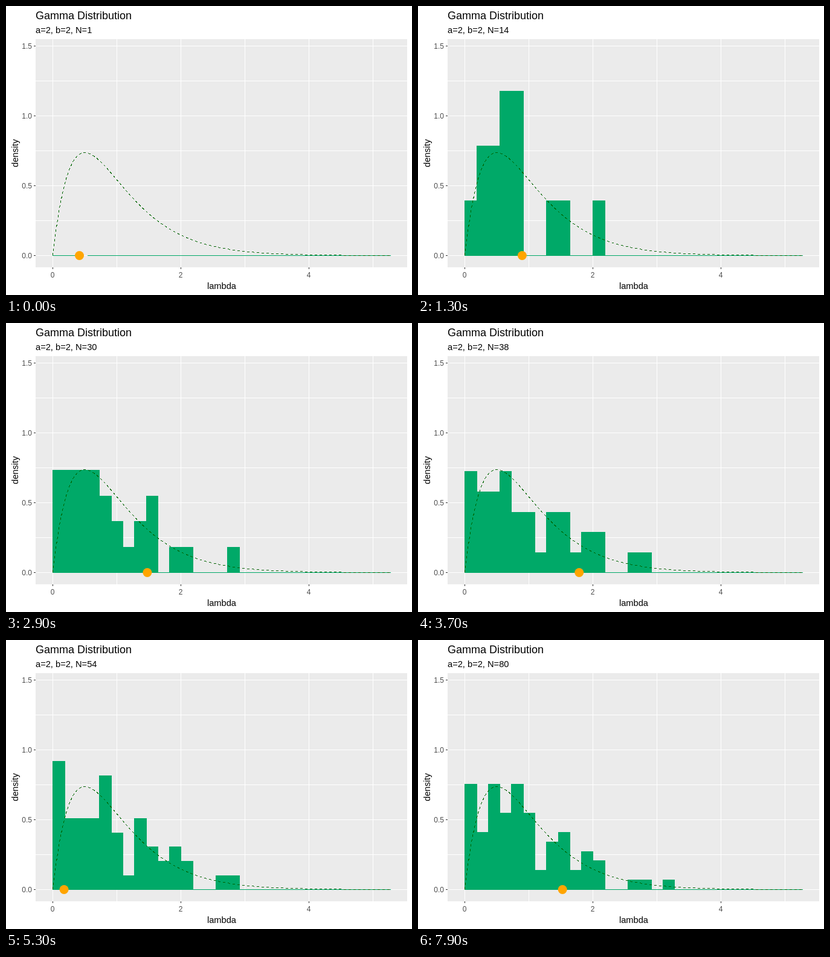
An HTML page that plays this animation: 672 px wide and 480 px high, repeating every 8 s.

```html
<!DOCTYPE html>
<html lang="en">
<head>
<meta charset="utf-8">
<title>Gamma Distribution</title>
<style>
  html, body { margin: 0; width: 100%; height: 100%; overflow: hidden; background: #fff; }
  svg { display: block; font: 14.67px "Liberation Sans", Arial, sans-serif; }
  path, rect { shape-rendering: crispEdges; }
  .tick { font-size: 12px; fill: #4d4d4d; }
</style>
</head>
<body>
<svg width="672" height="480" viewBox="0 0 672 480">
  <text x="49" y="22" font-size="18">Gamma Distribution</text>
  <text id="subtitle" x="49" y="45"></text>
  <rect x="49" y="55" width="615" height="379" fill="#ebebeb"/>
  <path id="grid" stroke="#fff"/>
  <path id="ticks" stroke="#333"/>
  <g id="labels" class="tick"></g>
  <text x="357" y="470" text-anchor="middle">lambda</text>
  <text transform="translate(20 244.5) rotate(-90)" text-anchor="middle">density</text>
  <path id="bars" fill="#00a968"/>
  <path id="curve" fill="none" stroke="#006400" stroke-dasharray="4 4"/>
  <circle id="dot" cy="414.5" r="7.5" fill="#ffa500"/>
</svg>
<script>
const $ = id => document.getElementById(id);
const STEP = 100, BINS = 29, MAX = 5.276, WIDTH = MAX / BINS, TOP = 1.5;
const px = v => 77.3 + 105.95 * v;
const py = d => 414.4 - 232.4 * d;

// Draws in the order they arrive
const samples = [
  .42, .62, 1.36, .82, .27, 2.09, .67, .07, .50, .77,
  1.52, .31, .59, .90, .46, 1.01, .24, .65, .13, 1.39,
  .39, 1.63, .98, .11, 2.84, .33, 1.93, .16, 1.17, 1.48,
  2.12, .69, 2.63, 1.07, 1.33, .14, 1.86, 1.79, .79, .12,
  .52, .86, 1.42, .75, .10, 1.72, .83, .29, 1.89, .88,
  .15, 1.03, 1.30, .18, .35, .95, 1.56, .48, 3.22, .71,
  1.04, .81, 1.50, .965, .44, .87, .14, 2.04, .38, .63,
  1.21, .51, .12, .74, 1.97, .41, .99, .57, .53, 1.53
];

function drawAxes() {
  let grid = '', ticks = '', labels = '';
  for (let v = 0; v <= 5; v++) {
    const x = Math.round(px(v)) + .5;
    grid += `M${x} 55V434`;
    if (v % 2) continue;
    ticks += `M${x} 434v3`;
    labels += `<text x="${x - .5}" y="451" text-anchor="middle">${v}</text>`;
  }
  for (let d = 0; d <= TOP; d += .25) {
    const y = Math.round(py(d)) + .5;
    grid += `M49 ${y}H664`;
    if (d % .5) continue;
    ticks += `M46 ${y}h3`;
    labels += `<text x="43" y="${y + 4.5}" text-anchor="end">${d.toFixed(1)}</text>`;
  }
  $('grid').setAttribute('d', grid);
  $('ticks').setAttribute('d', ticks);
  $('labels').innerHTML = labels;
}

function drawCurve() {
  const points = Array.from({ length: 101 }, (_, i) => {
    const v = MAX * i / 100;
    return `${px(v) + .2} ${py(4 * v * Math.exp(-2 * v)) + .1}`;
  });
  $('curve').setAttribute('d', 'M' + points.join('L'));
}

function drawSample(n) {
  const counts = Array(BINS).fill(0);
  samples.slice(0, n).forEach(v => counts[Math.floor(v / WIDTH)]++);
  let bars = '';
  counts.forEach((count, i) => {
    const density = count / n / WIDTH;
    if (density > TOP) return; // bars beyond the axis limit are dropped
    const left = Math.round(px(i * WIDTH));
    const right = Math.round(px((i + 1) * WIDTH)) + 1;
    bars += `M${left} 415V${Math.round(py(density))}H${right}V415Z`;
  });
  $('bars').setAttribute('d', bars);
  $('dot').setAttribute('cx', 77 + 106 * samples[n - 1]);
  $('subtitle').textContent = `a=2, b=2, N=${n}`;
}

const start = performance.now();
let shown = 0;
function tick() {
  const n = Math.floor((performance.now() - start) / STEP) % samples.length + 1;
  if (n !== shown) drawSample(shown = n);
  requestAnimationFrame(tick);
}

drawAxes();
drawCurve();
tick();
</script>
</body>
</html>
```
